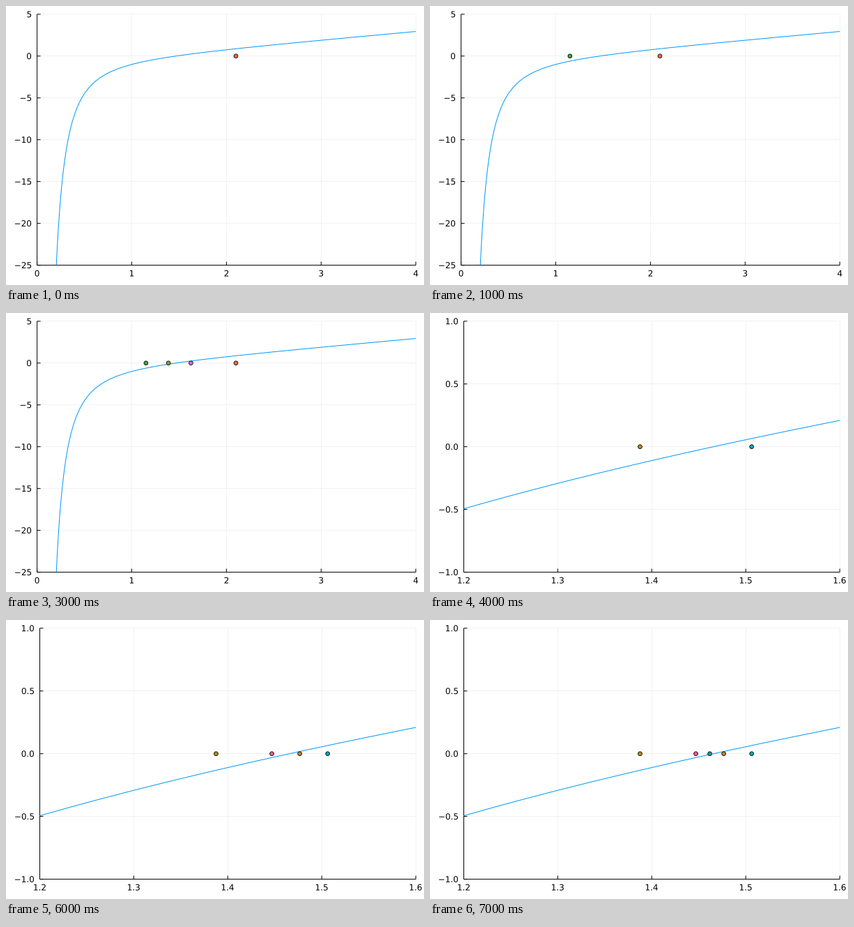
Recreate the animation shown at these times as a matplotlib script. Size 600 by 400 pixels, loop 8000 ms.

```python
import matplotlib.pyplot as plt
import numpy as np
from matplotlib.animation import FuncAnimation
from matplotlib.patches import Circle, PathPatch
from matplotlib.textpath import TextPath
from matplotlib.transforms import Affine2D

W, H, DPI = 600, 400, 100
PT = 72 / DPI  # points per pixel
TOP, RIGHT, BOTTOM = 11.8, 588.2, 371.6
TICK = 5
FONT_SIZE = 12
CURVE = "#009AFA"
COLORS = ["#E36F47", "#3EA44E", "#C371D2", "#AC8E18",
          "#00AAAE", "#ED5E93", "#C68225", "#00A98D"]
STEPS = len(COLORS)
ZOOM_STEP = 4

plt.rcParams["font.family"] = "DejaVu Sans"


def f(x):
    return x - 1 - 1 / x**2


def bisect(a, b, steps):
    mids = []
    for _ in range(steps):
        m = (a + b) / 2
        mids.append(m)
        if f(a) * f(m) <= 0:
            b = m
        else:
            a = m
    return mids


def line(xs, ys, width=1.0, color="black", **style):
    artist, = stage.plot(xs, ys, color=color, linewidth=width * PT,
                         solid_capstyle="butt", snap=False, **style)
    return artist


def label(text, x, y, align):
    """Place text by its inked width; y is the baseline."""
    path = TextPath((0, 0), text, size=FONT_SIZE)
    ink = path.get_extents()
    anchor = ink.x1 if align == "right" else (ink.x0 + ink.x1) / 2
    place = Affine2D().scale(1, -1).translate(x - anchor, y)
    return stage.add_patch(PathPatch(place.transform_path(path),
                                     color="black", linewidth=0, snap=False))


def dot(x, y, color):
    return stage.add_patch(Circle((x, y), 2.88, facecolor=color,
                                  edgecolor="black", linewidth=0.8 * PT,
                                  zorder=5))


def make_plot(left, xticks, yticks, decimals, shown):
    """Draw one view; return its fixed artists and its dots by step."""
    def px(x):
        return left + (x - xticks[0]) / np.ptp(xticks) * (RIGHT - left)

    def py(y):
        return BOTTOM - (y - yticks[0]) / np.ptp(yticks) * (BOTTOM - TOP)

    def text(value):
        return f"{value:.{decimals}f}".replace("-", "\u2212")

    grid = dict(width=0.5, alpha=0.1, zorder=1)
    parts = [line([left, RIGHT], [BOTTOM, BOTTOM]),
             line([left, left], [BOTTOM, TOP])]
    for value in xticks:
        x = px(value)
        parts += [line([x, x], [BOTTOM, TOP], **grid),
                  line([x, x], [BOTTOM, BOTTOM - TICK]),
                  label(text(value), x, BOTTOM + 16, "center")]
    for value in yticks:
        y = py(value)
        parts += [line([left, RIGHT], [y, y], **grid),
                  line([left, left + TICK], [y, y]),
                  label(text(value), left - 8.5, y + 4.4, "right")]

    x = np.linspace(max(xticks[0], 0.1), xticks[-1], 4000)
    x = x[f(x) >= yticks[0]]
    parts.append(line(px(x), py(f(x)), color=CURVE, zorder=3))
    dots = {i: dot(px(mids[i]), py(0), COLORS[i]) for i in shown}
    return parts, dots


fig = plt.figure(figsize=(W / DPI, H / DPI), dpi=DPI, facecolor="white")
stage = fig.add_axes([0, 0, 1, 1])
stage.set(xlim=(0, W), ylim=(H, 0))
stage.axis("off")

mids = bisect(0.2, 4, STEPS)
wide = make_plot(44.6, np.arange(5), np.arange(-25, 6, 5), 0,
                 range(ZOOM_STEP))
near = make_plot(48.5, np.linspace(1.2, 1.6, 5), np.linspace(-1, 1, 5), 1,
                 range(ZOOM_STEP - 1, STEPS))


def update(step):
    zoomed = step >= ZOOM_STEP
    for (parts, dots), active in ((wide, not zoomed), (near, zoomed)):
        for part in parts:
            part.set_visible(active)
        for i, mark in dots.items():
            mark.set_visible(active and i <= step)
    return []


anim = FuncAnimation(fig, update, frames=STEPS, interval=1000,
                     repeat=True, repeat_delay=0, blit=False)
plt.show()
```
